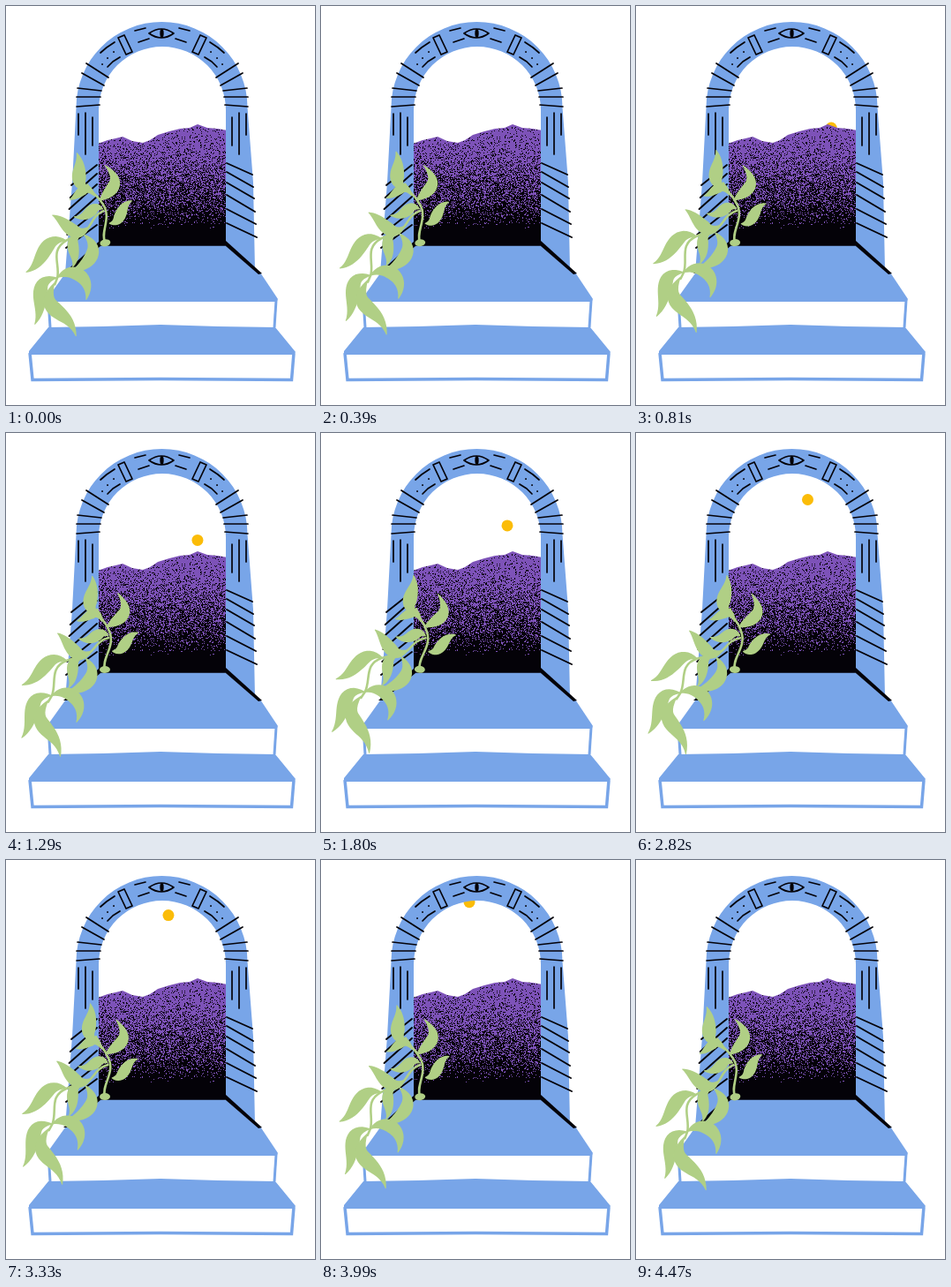
An HTML page with a canvas for the animation above (4.5 s loop, 350 by 452 pixels).

```html
<!DOCTYPE html>
<html>
<head>
<meta charset="utf-8">
<title>Archway</title>
<style>
html, body { margin: 0; width: 100%; height: 100%; overflow: hidden; background: #fff; }
canvas { display: block; width: 350px; height: 452px; }
</style>
</head>
<body>
<canvas id="stage" width="350" height="452"></canvas>
<script>
const LOOP = 4500, STEP = 30;
const BLUE = '#78a5e8', GREEN = '#b0cf85', PURPLE = '#7d52b8', INK = '#040208', SUN = '#fbbc08';
const ctx = document.getElementById('stage').getContext('2d');

function layer(paint) {
  const c = document.createElement('canvas');
  c.width = 350;
  c.height = 452;
  paint(c.getContext('2d'));
  return c;
}

function trace(g, pts) {
  g.beginPath();
  for (let i = 0; i < pts.length; i += 2) g.lineTo(pts[i], pts[i + 1]);
}

function fillPoly(g, color, pts) {
  trace(g, pts);
  g.closePath();
  g.fillStyle = color;
  g.fill();
}

function stroke(g, color, width, pts) {
  trace(g, pts);
  g.strokeStyle = color;
  g.lineWidth = width;
  g.stroke();
}

function seededRandom(seed) {
  return () => (seed = (seed * 16807) % 2147483647) / 2147483647;
}

// Speckled hills: purple at the ridge, dissolving into black.
function paintHills(g) {
  const random = seededRandom(77);
  fillPoly(g, PURPLE, [104, 156, 115, 152, 124, 150, 132, 148, 143, 153, 155, 155, 163, 152, 172, 146,
    185, 142, 197, 139, 208, 138, 217, 134, 228, 138, 240, 139, 251, 141, 251, 272, 104, 272]);
  g.globalCompositeOperation = 'source-atop';
  g.fillStyle = INK;
  for (let y = 134; y < 273; y++) {
    const depth = Math.min(1, Math.max(0, (y - 140) / 112));
    const density = 0.07 + 0.93 * depth ** 1.35;
    for (let x = 104; x < 251; x++) {
      if (random() < density) g.fillRect(x, y, 1, 1);
    }
  }
}

function paintSteps(g) {
  fillPoly(g, BLUE, [104, 271, 251, 271, 288, 302, 308, 332, 306, 336, 47, 336, 47, 331, 67, 303]);
  fillPoly(g, '#fff', [49, 335, 305, 335, 303, 364, 50, 364]);
  stroke(g, BLUE, 3, [48, 333, 50, 364]);
  stroke(g, BLUE, 3, [306, 333, 304, 364]);
  fillPoly(g, BLUE, [48, 364, 110, 363, 175, 361, 240, 363, 305, 364, 328, 392, 326, 395, 26, 395, 26, 391]);
  fillPoly(g, '#fff', [28, 395, 325, 395, 323, 423, 30, 423]);
  stroke(g, BLUE, 3.5, [27, 393, 30, 423.5, 175, 422.5, 323.5, 423.5, 326, 393]);
}

function paintArch(g) {
  g.fillStyle = BLUE;
  g.beginPath();
  g.moveTo(67, 303);
  g.lineTo(75, 200);
  g.lineTo(79.5, 115);
  g.arc(176.5, 115, 97, Math.PI, 0);
  g.lineTo(280, 200);
  g.lineTo(282, 300);
  g.lineTo(249, 271);
  g.lineTo(249, 118);
  g.arc(177, 118, 72, 0, Math.PI, true);
  g.lineTo(105, 272);
  g.fill();
}

function paintCarvings(g) {
  const mark = (...pts) => stroke(g, INK, 1.7, pts);
  const pair = (...pts) => {
    mark(...pts);
    mark(...pts.map((v, i) => i % 2 ? v : 354 - v));
  };
  g.lineCap = g.lineJoin = 'round';

  g.beginPath();
  g.moveTo(162, 31);
  g.quadraticCurveTo(176, 21, 190, 31);
  g.quadraticCurveTo(176, 41, 162, 31);
  g.strokeStyle = g.fillStyle = INK;
  g.lineWidth = 1.7;
  g.stroke();
  g.beginPath();
  g.ellipse(176.5, 31, 2.2, 5, 0, 0, 7);
  g.fill();

  pair(146, 28, 158, 25);
  pair(150, 41, 162, 37);
  pair(127, 36, 134, 33, 143, 52, 136, 55, 127, 36);
  pair(107, 53, 114, 47, 123, 41);
  pair(115, 69, 121, 63, 129, 58);
  for (const [x, y] of [[109, 66], [115, 59], [122, 52]]) {
    for (const px of [x, 354 - x]) g.fillRect(px - 0.8, y - 0.8, 1.7, 1.7);
  }
  pair(91, 65, 116, 81);
  pair(86, 76, 111, 90);
  pair(81, 93, 108, 96);
  pair(80, 103, 107, 103);
  pair(80, 114, 106, 112);
  pair(82, 122, 82, 146);
  pair(90, 121, 90, 168);
  pair(98, 126, 98, 158);

  // Slanted bands widening towards the floor
  [[178, 191], [188, 205], [200, 218], [214, 233], [230, 247], [246, 262]].forEach(([y0, y1], i) => {
    stroke(g, INK, 1.9, [250, y0, 279 + i, y1]);
    stroke(g, INK, 1.9, [103, y0 + 2, 74 - i * 1.2, y1 + 12]);
  });
  fillPoly(g, INK, [249, 266, 290, 303, 286, 304, 249, 272]);
  fillPoly(g, INK, [105, 267, 65, 303, 70, 303, 107, 272]);
  stroke(g, INK, 1.5, [104, 271, 250, 271]);
}

// Each leaf: base, two bends, tip, half width.
const LEAVES = [
  [105, 206, 84, 196, 103, 182, 97, 162, 7.5],
  [114, 220, 125, 211, 146, 206, 126, 181, 6.5],
  [109, 214, 101, 194, 92, 212, 80, 213, 5],
  [116, 230, 104, 220, 100, 240, 82, 233, 6],
  [120, 247, 136, 250, 134, 228, 150, 226, 6],
  [97, 247, 78, 262, 73, 236, 58, 227, 7],
  [90, 255, 110, 277, 84, 292, 70, 293, 7],
  [88, 253, 66, 258, 82, 275, 71, 289, 6],
  [69, 258, 42, 248, 42, 280, 18, 286, 7.5],
  [52, 298, 20, 295, 36, 325, 18, 346, 7.5],
  [48, 303, 22, 335, 60, 333, 62, 367, 8],
  [52, 298, 72, 286, 92, 306, 80, 328, 7]
];

function paintLeaf(g, [x0, y0, x1, y1, x2, y2, x3, y3, width]) {
  const left = [], right = [];
  for (let i = 0; i <= 20; i++) {
    const t = i / 20, u = 1 - t;
    const x = u * u * u * x0 + 3 * u * u * t * x1 + 3 * u * t * t * x2 + t * t * t * x3;
    const y = u * u * u * y0 + 3 * u * u * t * y1 + 3 * u * t * t * y2 + t * t * t * y3;
    const dx = u * u * (x1 - x0) + 2 * u * t * (x2 - x1) + t * t * (x3 - x2);
    const dy = u * u * (y1 - y0) + 2 * u * t * (y2 - y1) + t * t * (y3 - y2);
    const half = (0.4 + width * Math.sin(Math.PI * t ** 0.9)) / Math.hypot(dx, dy);
    left.push(x - dy * half, y + dx * half);
    right.unshift(x + dy * half, y - dx * half);
  }
  fillPoly(g, GREEN, left.concat(right));
}

function paintPlant(g) {
  g.strokeStyle = g.fillStyle = GREEN;
  g.lineWidth = 2.6;
  g.lineCap = 'round';
  g.stroke(new Path2D('M112 268C108 255 124 242 117 225S106 212 103 200'));
  g.stroke(new Path2D('M116 232C100 236 100 250 88 253S76 255 69 258C48 266 58 284 52 298L48 305'));
  g.beginPath();
  g.ellipse(112, 268, 6, 4, 0, 0, 7);
  g.fill();
  LEAVES.forEach(leaf => paintLeaf(g, leaf));
}

const hills = layer(paintHills);
const gate = layer(g => {
  paintArch(g);
  paintSteps(g);
  paintCarvings(g);
});

function swayDegrees(t) {
  const p = t < 2250 ? (t - 45) / 2205 : (4390 - t) / 2140;
  return 17.3 * Math.max(0, p) - 9.5;
}

function drawSun(t) {
  const d = t - 2280;
  ctx.fillStyle = SUN;
  ctx.beginPath();
  ctx.arc(204 - 0.016 * d - 2.95e-6 * d * d, 90.5 - 0.029 * d + 2.3e-6 * d * d, 6.5, 0, 7);
  ctx.fill();
}

function frame(now) {
  const t = Math.floor(now % LOOP / STEP) * STEP;
  ctx.fillStyle = '#fff';
  ctx.fillRect(0, 0, 350, 452);
  drawSun(t);
  ctx.drawImage(hills, 0, 0);
  ctx.drawImage(gate, 0, 0);
  ctx.save();
  ctx.translate(114, 266);
  ctx.rotate(swayDegrees(t) * Math.PI / 180);
  ctx.translate(-114, -266);
  paintPlant(ctx);
  ctx.restore();
}

let start;
function tick(now) {
  start ??= now;
  frame(now - start);
  requestAnimationFrame(tick);
}
frame(0);
requestAnimationFrame(tick);
</script>
</body>
</html>
```
